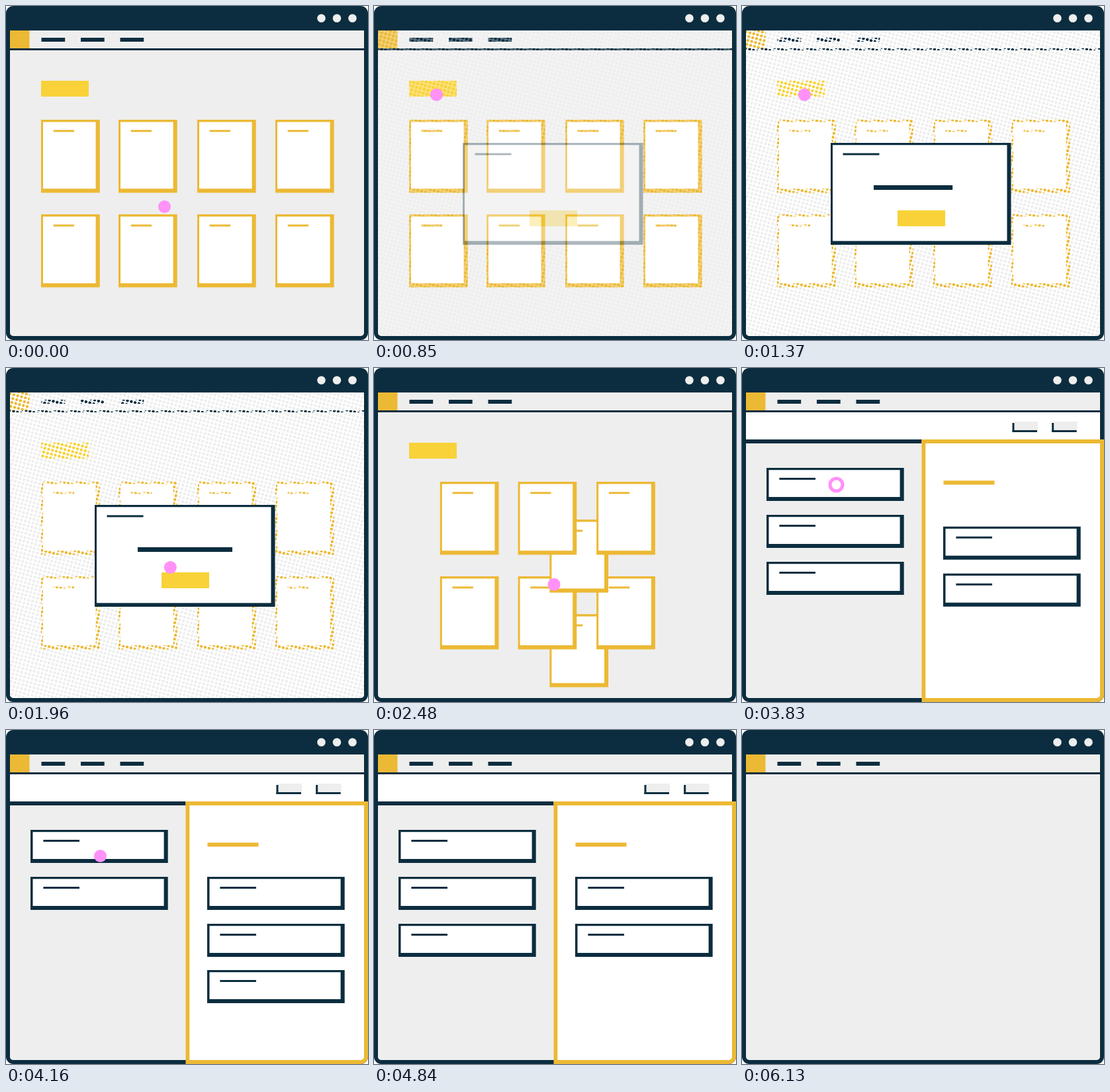
Recreate the animation shown at these times as an HTML page with a canvas. Size 547x505 px, loop 6160 ms.

```html
<!DOCTYPE html>
<html lang="en">
<head>
<meta charset="utf-8">
<title>Board demo</title>
<style>
  html, body { margin: 0; width: 100%; height: 100%; overflow: hidden; background: #fff; }
  canvas { display: block; }
</style>
</head>
<body>
<canvas id="stage" width="547" height="505"></canvas>
<script>
const W = 547, H = 505, LOOP = 6160, STEP = 30;
const NAVY = '#0b2d3f', GOLD = '#ecb934', YELLOW = '#f8d238', GREY = '#eeeeee', WHITE = '#ffffff', PINK = '#ff91f8';
const stage = document.getElementById('stage').getContext('2d');
let ctx = stage;

function makeLayer() {
  const canvas = document.createElement('canvas');
  canvas.width = W;
  canvas.height = H;
  return canvas.getContext('2d');
}

// Box given by its edges.
function box(color, x0, y0, x1, y1) {
  ctx.fillStyle = color;
  ctx.fillRect(x0, y0, x1 - x0, y1 - y0);
}

function roundBox(color, x0, y0, x1, y1, radii) {
  ctx.fillStyle = color;
  ctx.beginPath();
  ctx.roundRect(x0, y0, x1 - x0, y1 - y0, radii);
  ctx.fill();
}

function disc(color, x, y, r) {
  ctx.fillStyle = color;
  ctx.beginPath();
  ctx.arc(x, y, r, 0, Math.PI * 2);
  ctx.fill();
}

// Draws a group with one common opacity.
function fade(alpha, draw) {
  if (alpha <= 0) return;
  if (alpha >= 1) return draw();
  const outer = ctx;
  ctx = makeLayer();
  draw();
  outer.save();
  outer.globalAlpha = alpha;
  outer.drawImage(ctx.canvas, 0, 0);
  outer.restore();
  ctx = outer;
}

// Stepped progress: the first of `count` steps lands at `start`.
function progress(t, start, count) {
  const done = Math.floor((t - start) / STEP) + 1;
  return Math.max(0, Math.min(1, done / count));
}

const mix = (a, b, p) => a + (b - a) * p;

// White sheet with round holes on a tilted raster.
const screen = (() => {
  const layer = makeLayer();
  layer.fillStyle = WHITE;
  layer.fillRect(0, 0, W, H);
  layer.globalCompositeOperation = 'destination-out';
  layer.rotate(Math.PI / 12);
  layer.beginPath();
  for (let x = -20; x < 680; x += 6) {
    for (let y = -150; y < 500; y += 6) {
      layer.moveTo(x + 2.2, y);
      layer.arc(x, y, 2.2, 0, Math.PI * 2);
    }
  }
  layer.fill();
  return layer.canvas;
})();

function drawWindow() {
  ctx.clearRect(0, 0, W, H);
  box(WHITE, 0, 0, W, H);
  roundBox(NAVY, 0, 0, W, H, 11);
  roundBox(GREY, 6, 37, 541, 499, [0, 0, 5, 5]);
  for (const x of [476.5, 500, 523.5]) disc(GREY, x, 18.5, 6.3);
  box(GOLD, 6, 37, 35.5, 64);
  for (const x of [53.5, 113, 172.5]) box(NAVY, x, 48, x + 35.7, 54);
  box(NAVY, 6, 64, 541, 67);
}

function drawTile(x, y) {
  box(GOLD, x, y, x + 88.7, y + 110.4);
  box(WHITE, x + 3, y + 3.4, x + 82.6, y + 104.2);
  box(GOLD, x + 18.7, y + 15.4, x + 50, y + 18.4);
}

const slotX = i => [53, 170, 289, 407][i % 4];
const slotY = i => 172 + 143 * Math.floor(i / 4);

function drawGrid(t) {
  box(YELLOW, 53, 113, 125, 137);
  const shift = progress(t, 2390, 10);
  ctx.save();
  ctx.beginPath();
  ctx.rect(6, 67, 535, 432);
  ctx.clip();
  for (let i = 7; i >= 0; i--) {
    const x = mix(slotX(i), slotX(i + 1), shift);
    const y = mix(slotY(i), slotY(i + 1), shift);
    fade(i === 7 ? 1 - progress(t, 2780, 3) : 1, () => drawTile(x, y));
  }
  fade(progress(t, 2690, 3), () => drawTile(slotX(0), slotY(0)));
  ctx.restore();
  if (t >= 2840) drawTile(slotX(7), slotY(7));
}

function drawScreen(alpha) {
  if (alpha <= 0) return;
  ctx.save();
  ctx.beginPath();
  ctx.roundRect(6, 37, 535, 462, [0, 0, 5, 5]);
  ctx.rect(134, 207, 272.5, 154);
  ctx.clip('evenodd');
  ctx.globalAlpha = alpha;
  ctx.drawImage(screen, 0, 0);
  ctx.restore();
}

function drawDialog(t) {
  box(NAVY, 134, 207, 406.5, 361);
  box(WHITE, 137, 210.2, 400.5, 355.3);
  box(NAVY, 152.5, 222.5, 207.5, 225.5);
  box(YELLOW, 235, 309, 307, 333);
  const typed = progress(t, 1100, 12);
  if (typed > 0) box(NAVY, 199, 271, 199 + 143 * typed, 278);
}

function drawRow(x, y) {
  box(NAVY, x, y, x + 207.7, y + 50);
  box(WHITE, x + 3.5, y + 3.2, x + 201.6, y + 44);
  box(NAVY, x + 19.4, y + 15, x + 74, y + 18);
}

function drawPanel(t) {
  box(WHITE, 6, 67, 541, 108);
  for (const x of [408.5, 468.2]) {
    box(GREY, x + 3, 81, x + 38.5, 94);
    box(NAVY, x, 83, x + 3, 97);
    box(NAVY, x, 94, x + 37.5, 97);
  }
  roundBox(GREY, 6, 108, 271.5, 499, [0, 0, 0, 5]);
  box(NAVY, 6, 108, 271.5, 114);
  roundBox(GOLD, 271.5, 108, W, H, [0, 0, 11, 0]);
  roundBox(WHITE, 277.3, 114, 541, 499, [0, 0, 5, 0]);
  box(GOLD, 304.5, 170.3, 381.5, 176.4);

  const down = progress(t, 3830, 4) * 71;
  const swap = progress(t, 3950, 3);
  const up = progress(t, 4040, 4) * 71;
  fade(1 - swap, () => drawRow(37, 151));
  drawRow(37, 222 - up);
  drawRow(37, 293 - up);
  fade(progress(t, 4460, 3), () => drawRow(37, 293));
  fade(swap, () => drawRow(304, 222));
  drawRow(304, 222 + down);
  fade(1 - progress(t, 4550, 3), () => drawRow(304, 293 + Math.min(down, 70)));
}

// Pointer legs: first step time, number of steps, end point.
const START = [239.5, 303.5];
const LEGS = [
  [30, 14, 94.5, 134.2],
  [1600, 15, 272, 327.2],
  [2870, 13, 107.4, 250],
  [3380, 5, 142.5, 176.5],
  [4160, 10, 142.5, 316.5]
];
const PRESSES = [[550, 850], [2190, 2300], [3260, 3290], [3630, 4160]];

function drawPointer(t) {
  let [x, y] = START;
  for (const [start, count, endX, endY] of LEGS) {
    const p = progress(t, start, count);
    x = mix(x, endX, p);
    y = mix(y, endY, p);
  }
  const pressed = PRESSES.some(([from, to]) => t >= from && t < to);
  fade(1 - progress(t, 4780, 3), () => {
    if (!pressed) return disc(PINK, x, y, 9.5);
    ctx.strokeStyle = PINK;
    ctx.lineWidth = 5;
    ctx.beginPath();
    ctx.arc(x, y, 9.5, 0, Math.PI * 2);
    ctx.stroke();
  });
}

function render(t) {
  drawWindow();
  if (t < 3350) drawGrid(t);
  const dialog = progress(t, 850, 3) - progress(t, 2300, 3);
  drawScreen(dialog);
  fade(dialog, () => drawDialog(t));
  fade(progress(t, 3290, 3) - progress(t, 6070, 3), () => drawPanel(t));
  drawPointer(t);
}

const origin = performance.now();
function tick() {
  render((performance.now() - origin) % LOOP);
  requestAnimationFrame(tick);
}
tick();
</script>
</body>
</html>
```
